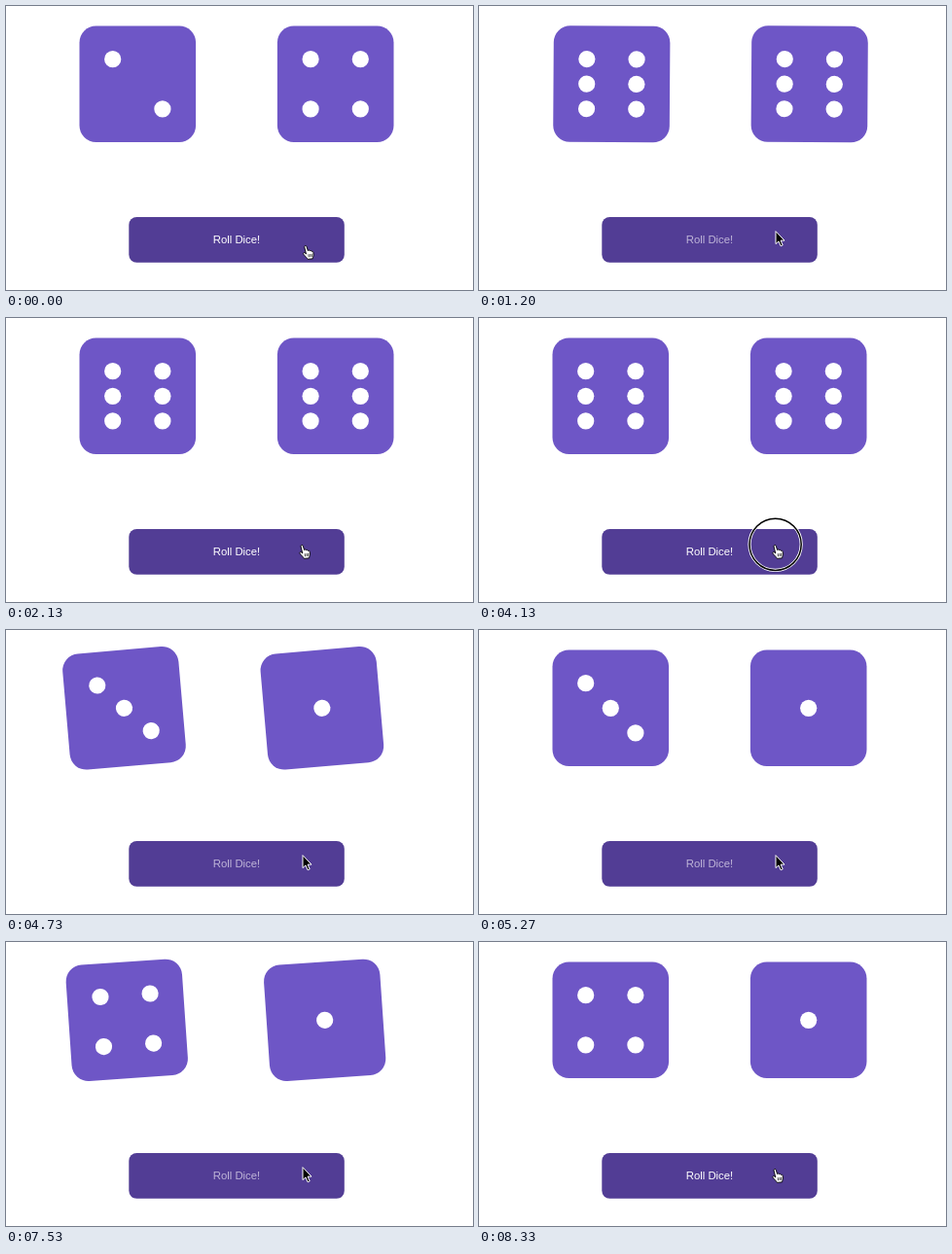
Animation, 480 px wide and 292 px high, one loop 8590 ms. Source, as an HTML page:

```html
<!DOCTYPE html>
<html lang="en">
<head>
<meta charset="utf-8">
<title>Roll Dice</title>
<style>
html, body { margin: 0; width: 100%; height: 100%; overflow: hidden; background: #fff; }
svg { display: block; width: 480px; height: 292px; }
text { font: 11.35px "Liberation Sans", Arial, sans-serif; text-anchor: middle; }
</style>
</head>
<body>
<svg viewBox="0 0 480 292">
  <g id="left" fill="#fff"></g>
  <g id="right" fill="#fff"></g>
  <rect x="126.3" y="217" width="221.5" height="46.8" rx="8" fill="#523d95"/>
  <text id="label" x="237" y="244.4">Roll Dice!</text>
  <g id="ring" fill="none">
    <circle cx="304.6" cy="232.8" r="26.6" stroke="#fff" stroke-width="3.2"/>
    <circle cx="304.6" cy="232.8" r="26.6" stroke="#000" stroke-width="1.5"/>
  </g>
  <g id="hand" fill="#fff" stroke="#000" stroke-width=".9" stroke-linejoin="round">
    <path d="M1.2 1.1C1.3-.4 3.1-.6 3.5.8L4.8 5C5.4 4.1 6.6 4.3 6.8 5.2C7.5 4.6 8.5 4.9 8.7 5.8C9.5 5.4 10.3 5.9 10.4 6.8L10.6 9.4C10.6 10.7 9.9 11.4 9.8 13.2L4.6 13.8C4.1 12.4 2 10.9.3 8.6C-.5 7.4.9 6.5 1.9 7.4L3 8.4Z"/>
    <path fill="none" stroke-width=".7" d="M5.3 8.6l.4 3M7.1 8.4l.3 3M8.8 8.2l.1 3"/>
  </g>
  <path id="arrow" d="M305 231.6V244.6L308 241.9L310.1 246.8L312.2 245.9L310.1 241.1H314Z" stroke="#fff" stroke-width="1"/>
</svg>
<script>
const LOOP = 8590, FPS = 15;
const DIE_Y = 80.3, SIZE = 119.6, DOT_GAP = 25.6;
const $ = id => document.getElementById(id);
const show = (id, on) => $(id).setAttribute("visibility", on ? "visible" : "hidden");

// Each roll: press, release, start of the shake, button enabled again, faces.
const rolls = [
  { press: 930, release: 1066, shake: 1057, end: 2130, faces: [6, 6] },
  { press: 4130, release: 4198, shake: 4234, end: 5330, faces: [3, 1] },
  { press: 6930, release: 7066, shake: 7044, end: 8130, faces: [4, 1] }
];

// Shake amount at every tenth of its one second.
const swing = [0, -.25, .5, -1, 1, -1, 1, -1, .5, -.25, 0, 0];

function shakeAt(ms) {
  if (ms <= 0 || ms >= 1000) return 0;
  const i = Math.floor(ms / 100);
  return swing[i] + (swing[i + 1] - swing[i]) * (ms / 100 - i);
}

function pips(n) {
  const spots = n % 2 ? [[0, 0]] : [];
  if (n > 1) spots.push([-1, -1], [1, 1]);
  if (n > 3) spots.push([1, -1], [-1, 1]);
  if (n === 6) spots.push([-1, 0], [1, 0]);
  return spots.map(([x, y]) =>
    `<circle cx="${x * DOT_GAP}" cy="${y * DOT_GAP}" r="8.6"/>`).join("");
}

function drawDie(id, x, face, shake) {
  const die = $(id);
  if (die.dataset.face !== String(face)) {
    die.dataset.face = face;
    die.innerHTML = `<rect x="${-SIZE / 2}" y="${-SIZE / 2}" width="${SIZE}" height="${SIZE}" rx="17" fill="#6e56c6"/>` + pips(face);
  }
  die.setAttribute("transform", `translate(${x + 14 * shake} ${DIE_Y}) rotate(${5 * shake})`);
}

function draw(now) {
  // The picture steps at a fixed rate.
  const t = Math.floor((now % LOOP + 3.5) * FPS / 1000) * 1000 / FPS;
  const at = t + 4;
  const roll = rolls.filter(r => at >= r.press).pop();
  const rolled = rolls.filter(r => at >= r.release).pop();
  const busy = !!rolled && at < rolled.end;
  const faces = rolled ? rolled.faces : [2, 4];
  const shake = busy ? shakeAt(t - rolled.shake) : 0;

  drawDie("left", 135.3, faces[0], shake);
  drawDie("right", 338.7, faces[1], shake);
  $("label").setAttribute("fill", busy ? "#bfb5d8" : "#fff");
  show("ring", roll && at < roll.release);
  show("arrow", busy);
  show("hand", !busy);

  const u = Math.min(1, t / 467), rest = 1 - u * u * (3 - 2 * u);
  $("hand").setAttribute("transform", `translate(${301.8 + 3.7 * rest} ${233.6 + 13 * rest})`);
}

const start = performance.now();
function tick() {
  draw(performance.now() - start);
  requestAnimationFrame(tick);
}
tick();
</script>
</body>
</html>
```
